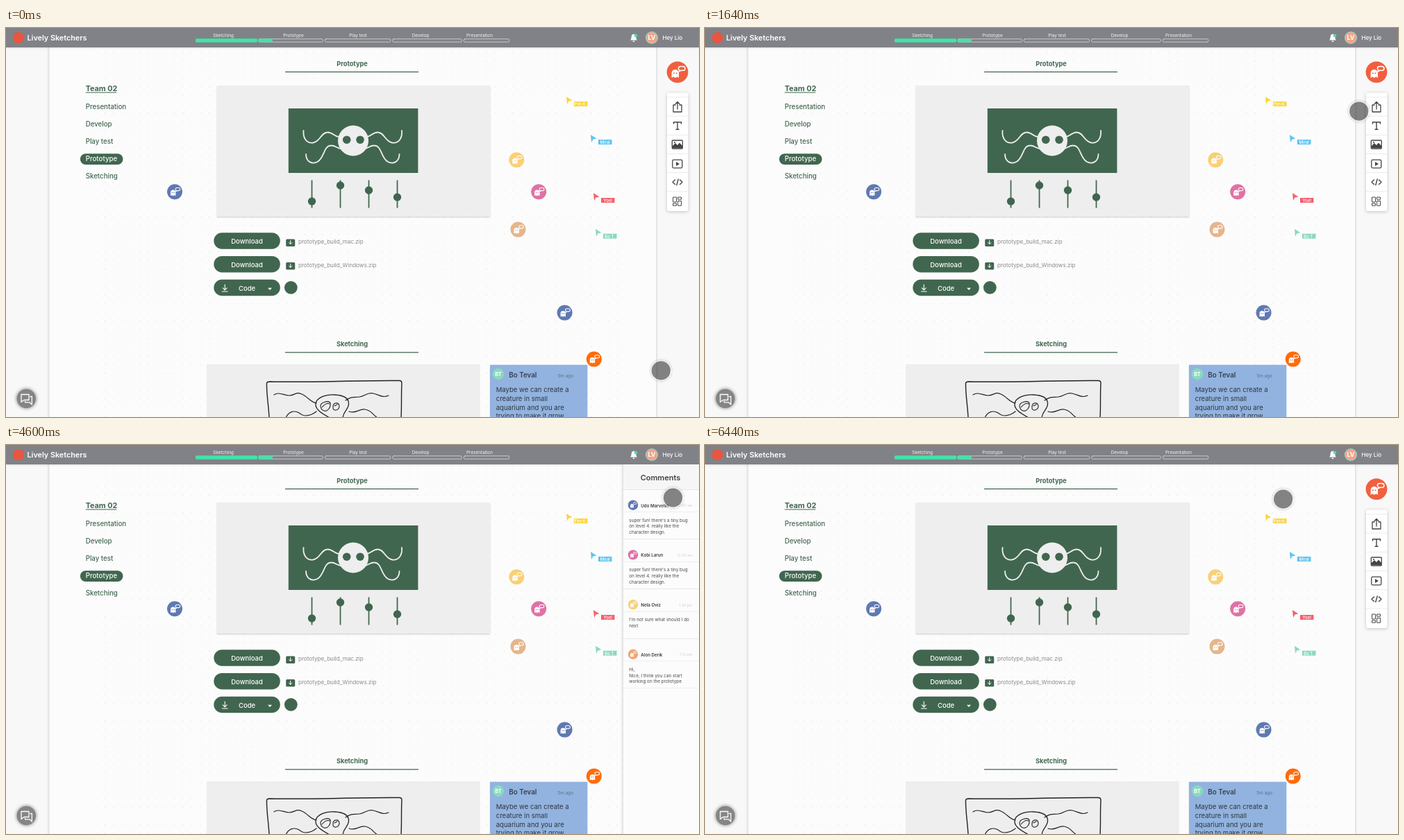
Recreate the animation shown at these times as an HTML page with a canvas. Size 998 by 561 pixels, loop 7 s.

```html
<!DOCTYPE html>
<html lang="en">
<head>
<meta charset="utf-8">
<title>Prototype board</title>
<style>
html, body { margin: 0; width: 100%; height: 100%; overflow: hidden; background: #fbfbfb; }
canvas { display: block; width: 998px; height: 561px; }
</style>
</head>
<body>
<canvas id="stage"></canvas>
<script>
const W = 998, H = 561, LOOP = 7000, STEP = 40;
const GREEN = '#41664f', BLUE = '#5f79b2', PINK = '#df72a6', YELLOW = '#f9d077', TAN = '#e6b58c', MINT = '#8ad9bd';
const ratio = window.devicePixelRatio || 1;
let g;

function setup(canvas) {
  canvas.width = W * ratio;
  canvas.height = H * ratio;
  const c = canvas.getContext('2d');
  c.scale(ratio, ratio);
  return c;
}

function layer(draw) {
  const canvas = document.createElement('canvas');
  g = setup(canvas);
  draw();
  return canvas;
}

function text(s, x, y, size, color, weight = 400, align = 'left') {
  g.font = `${weight} ${size}px Inter, sans-serif`;
  g.fillStyle = color;
  g.textAlign = align;
  g.textBaseline = 'alphabetic';
  g.fillText(s, x, y + size * 0.36);
}

function rect(x, y, w, h, color, r = 0) {
  g.fillStyle = color;
  g.beginPath();
  g.roundRect(x, y, w, h, r);
  g.fill();
}

function frame(x, y, w, h, color, lw = 1, r = 0) {
  g.strokeStyle = color;
  g.lineWidth = lw;
  g.beginPath();
  g.roundRect(x, y, w, h, r);
  g.stroke();
}

function disc(x, y, r, color) {
  g.fillStyle = color;
  g.beginPath();
  g.arc(x, y, r, 0, 7);
  g.fill();
}

function stroke(d, color, lw = 1) {
  g.strokeStyle = color;
  g.lineWidth = lw;
  g.lineCap = g.lineJoin = 'round';
  g.stroke(new Path2D(d));
}

function fill(d, color) {
  g.fillStyle = color;
  g.fill(new Path2D(d));
}

function at(x, y, scale, draw) {
  g.save();
  g.translate(x, y);
  g.scale(scale, scale);
  draw();
  g.restore();
}

function shadowed(color, blur, dx, dy, draw) {
  g.save();
  g.shadowColor = color;
  g.shadowBlur = blur * ratio;
  g.shadowOffsetX = dx * ratio;
  g.shadowOffsetY = dy * ratio;
  draw();
  g.restore();
}

// Round badge holding a ghost and a speech bubble
function badge(x, y, r, color) {
  disc(x, y, r, color);
  at(x, y, r / 11, () => {
    fill('M-6 6V1A3.7 3.7 0 0 1 1.4 1V6L-.4 4.8L-2.3 6L-4.2 4.8Z', '#fff');
    disc(-3.6, 1.2, 0.75, color);
    disc(-1, 1.2, 0.75, color);
    stroke('M2.8 -5.8H6Q7.8 -5.6 7.8 -3.7Q7.8 -1.9 6 -1.7H3.6L1.6 -.6L2 -2.1Q1 -2.6 1 -3.8Q1 -5.6 2.8 -5.8Z', '#fff', 1.1);
  });
}

function pointer(x, y, color, name) {
  fill(`M${x} ${y}l8.5 5.6l-5 1l-2.4 4.4z`, color);
  rect(x + 11, y + 7, 19.5, 7, color);
  text(name, x + 20.7, y + 10.7, 6, '#fff', 500, 'center');
}

function heading(s, y) {
  text(s, 498.5, y, 9.2, GREEN, 700, 'center');
  rect(402, y + 11.3, 192, 1.2, GREEN);
}

function header() {
  shadowed('rgba(0,0,0,.12)', 3, 0, 1, () => rect(0, 0, W, 28, '#818287'));
  disc(18, 14, 8, '#e9553f');
  text('Lively Sketchers', 30.5, 14, 10.8, '#fff', 600);
  const phases = [
    ['Sketching', 313, 273, 89, 1], ['Prototype', 414, 363.5, 93, 0.22],
    ['Play test', 507, 459, 95, 0], ['Develop', 597, 556.5, 100, 0], ['Presentation', 682, 659, 66, 0]
  ];
  for (const [name, mid, x, w, done] of phases) {
    text(name, mid, 10.3, 6.4, '#f4f4f4', 400, 'center');
    frame(x + 0.3, 15.8, w - 0.6, 4.4, done === 1 ? '#43e2a8' : '#dcdcde', 0.8, 1.5);
    if (done) rect(x, 15.5, w * done, 5, '#43e2a8', 1.5);
  }
  fill('M899 17.5Q900.7 16 900.7 12.5Q900.9 9 904 8.8Q907.2 9 907.3 12.5Q907.3 16 909 17.5ZM902.4 18.5H905.6Q905.3 20.2 904 20.2Q902.7 20.2 902.4 18.5Z', '#fff');
  disc(907, 11, 2.3, '#43e2a8');
  disc(930, 14, 9, '#9bd8bc');
  disc(930, 14, 7.9, '#f0a48c');
  text('LV', 930, 14, 8.8, '#fff', 700, 'center');
  text('Hey Lio', 945.5, 14.5, 8, '#fff', 500);
}

function creature() {
  rect(406.8, 115.9, 186.6, 93.1, GREEN);
  const arms = 'M428.5 148C427.5 159 433 166.5 442 165.5C453 164 453 151 463 150.5C471 150 473 158 481 157' +
    'M432 182C432 193 441 197 448.5 193C459 187 457 170 468 169.5C475 169 477 175 484 174';
  stroke(arms, '#eee', 1.8);
  g.save();
  g.translate(998.5, 0);
  g.scale(-1, 1);
  stroke(arms, '#eee', 1.8);
  g.restore();
  disc(500, 162.5, 22, '#eee');
  disc(490.7, 161.2, 5.8, GREEN);
  disc(510, 161.2, 5.8, GREEN);
  [250, 227, 234, 244].forEach((y, i) => {
    const x = 440.5 + i * 41;
    rect(x - 0.9, 219.5, 1.8, 40, GREEN);
    disc(x, y, 5.7, GREEN);
  });
}

function downloads() {
  [295.2, 328.9, 362.7].forEach((y, i) => {
    rect(299.3, y, 95.5, 23.5, GREEN, 11.7);
    text(i < 2 ? 'Download' : 'Code', 347, y + 12.5, 9.5, '#fff', 500, 'center');
  });
  ['mac', 'Windows'].forEach((os, i) => {
    const y = 308.4 + i * 33.6;
    rect(403.2, y - 4, 13, 10.5, GREEN, 1.5);
    stroke(`M409.7 ${y - 1.8}v5M407.5 ${y + 1.2}l2.2 2.2l2.2 -2.2`, '#fff', 1);
    text(`prototype_build_${os}.zip`, 421, y, 8.1, '#8b8b8b');
  });
  stroke('M315.2 370V377.5M312.2 374.8L315.2 377.8L318.2 374.8M311.5 380H319', '#fff', 1.1);
  fill('M377 374.8H383L380 378Z', '#fff');
  disc(410.3, 374.3, 9.4, GREEN);
}

function sketch() {
  rect(288.8, 485, 394, 80, '#eee');
  const ink = '#222';
  stroke('M379 562C378 542 375 528 375.5 512.5Q375.5 510 380 510C440 511.5 500 508 566 508.5Q570 508.5 570 512C569 530 570 545 569 562', ink, 1.4);
  stroke('M386 529C393 524 400 530 408 530C416 530 417 524 426 528C435 532 439 540 447 541', ink, 1.2);
  stroke('M489 537C497 531 501 533 509 532C517 531 520 525 529 527C538 529 542 534 551 530', ink, 1.2);
  stroke('M403 562C407 553 415 551 422 555Q427 559 431 559Q440 559 447 553', ink, 1.2);
  stroke('M494 553C503 557 508 549 517 550C526 551 528 558 535 562', ink, 1.2);
  stroke('M466 562C455 556 445 550 446 542C447 533 460 528.5 473 529C485 529.5 493 533 493.5 541C494 550 486 552 485 562', ink, 1.3);
  stroke('M453 545C453 540 465 536 467 541C468 547 463 554 458 552Q453 550 453 545M455 547Q461 540 466 542', ink, 1.1);
  stroke('M471 545C472 540 479 539 480 545C480 551 473 553 471 549ZM473 545L477 543', ink, 1.1);
}

function note() {
  shadowed('rgba(0,0,0,.15)', 2, 0, 1, () => rect(697, 485.8, 140.3, 80, '#92b3df'));
  disc(709, 499, 8.2, MINT);
  text('BT', 709, 499.2, 7.5, '#fff', 700, 'center');
  text('Bo Teval', 724.3, 500, 9.8, '#35414f', 600);
  text('5m ago', 794.5, 501.3, 6.4, '#5d6f88');
  ['Maybe we can create a', 'creature in small', 'aquarium and you are', 'trying to make it grow'].forEach((s, i) =>
    text(s, 705.7, 522 + i * 12.6, 9.55, '#2e3640'));
}

function toolbar() {
  shadowed('rgba(0,0,0,.22)', 5, 0, 1, () => rect(952, 93.5, 30.5, 170.5, '#fff', 3));
  for (let i = 0; i < 6; i++) rect(952, 99.5 + i * 27.2, 30.5, 0.7, '#e2e2e2');
  const dark = '#444';
  stroke('M964 111H961V121H973V111H970M967 117V106.8M964 109.5L967 106.5L970 109.5', dark, 1.3);
  stroke('M961.5 138V135.8H972.5V138M967 135.8V146.2M965 146.2H969', dark, 1.4);
  frame(959.3, 162, 15, 12, dark, 1.3, 1);
  fill('M960 173V170L964 166L967 169L970 165.5L974 170V173Z', dark);
  disc(963, 165, 1.1, dark);
  frame(959.8, 190.2, 14, 11.6, dark, 1.3, 1.5);
  fill('M965 193V199L970 196Z', dark);
  stroke('M963.5 219L960 222.3L963.5 225.6M970.5 219L974 222.3L970.5 225.6M968.2 218L965.8 226.5', dark, 1.4);
  frame(961, 244, 4.5, 7, dark, 1);
  frame(961, 253, 4.5, 3.2, dark, 1);
  frame(968, 244, 4.5, 3.2, dark, 1);
  frame(968, 249.5, 4.5, 6.7, dark, 1);
}

function page() {
  rect(0, 0, W, H, '#f8f8f8');
  shadowed('rgba(0,0,0,.22)', 4, 0, 0, () => rect(62.3, 0, 873.7, H + 10, '#fcfcfc'));
  for (let x = 130; x <= 880; x += 12.5)
    for (let y = 35; y < H; y += 12.5) disc(x, y, 0.6, '#d8d8d8');

  heading('Prototype', 51.5);
  text('Team 02', 114.7, 87.5, 10.8, GREEN, 700);
  rect(114.7, 92.6, 44.5, 1, GREEN);
  rect(106.8, 181.2, 61.7, 15.8, GREEN, 7.9);
  ['Presentation', 'Develop', 'Play test', 'Prototype', 'Sketching'].forEach((s, i) =>
    text(s, 114.7, 114 + i * 24.9, 9.7, i === 3 ? '#fff' : GREEN, 500));

  shadowed('rgba(0,0,0,.2)', 2, 0, 1, () => rect(304, 83, 393.3, 189, '#eee'));
  creature();
  downloads();
  heading('Sketching', 456);
  sketch();
  note();

  pointer(807, 99, '#fbd43c', 'Pim K.');
  pointer(842, 154, '#5bc4f0', 'Miral');
  pointer(846, 238, '#f4606c', 'Yoel');
  pointer(849, 289.7, MINT, 'Bo T.');
  badge(243, 236.3, 11, BLUE);
  badge(735.3, 190.3, 11, YELLOW);
  badge(767.2, 236.3, 11, PINK);
  badge(737.5, 290.6, 11, TAN);
  badge(804.6, 410.6, 11, BLUE);
  badge(846.8, 477.6, 11, '#ff6b0a');
  badge(967, 63.6, 15.4, '#f0603f');
  toolbar();

  shadowed('rgba(0,0,0,.3)', 4, 0, 0, () => disc(29.3, 534.5, 15, '#c9c9c9'));
  disc(29.3, 534.5, 13.7, '#858585');
  stroke('M22 528.5H33V536.5H26L22 539.5ZM35 531.5H37.3V543L33.8 539.8H27.5V538.5', '#fff', 1.3);
  header();
}

function comments() {
  shadowed('rgba(0,0,0,.18)', 4, -1, 1, () => rect(889, 28, 120, H, '#fcfcfc'));
  rect(889, 28, 109, 36, '#f6f6f6');
  rect(889, 64, 109, 0.8, '#e2e2e2');
  text('Comments', 942.5, 47.3, 11, '#424247', 600, 'center');
  const bug = ['super fun! there\'s a tiny bug', 'on level 4. really like the', 'character design.'];
  const posts = [
    ['Udo Marvelin', BLUE, '9:00 am', bug],
    ['Kobi Larun', PINK, '12:30 am', bug],
    ['Nela Oviz', YELLOW, '1:30 pm', ['I\'m not sure what should I do', 'next']],
    ['Alon Derik', '#efa775', '7:12 pm', ['Hi,', 'Nice, I think you can start', 'working on the prototype']]
  ];
  posts.forEach(([name, color, time, lines], i) => {
    const y = 86.7 + i * 71.7;
    badge(903, y, 7.2, color);
    text(name, 914.3, y + 0.8, 6.2, '#3c3c42', 600);
    text(time, 988.5, y + 0.8, 5.2, '#cfcfcf', 400, 'right');
    rect(889, y + 9.6, 109, 0.7, '#e8e8e8');
    rect(889, y + 48.6, 109, 0.7, '#e2e2e2');
    lines.forEach((s, n) => text(s, 897.3, y + 21.8 + n * 8.7, 6.35, '#4a4a4e'));
  });
  // Keep the header clear of the panel's shadow
  g.clearRect(0, 0, W, 28);
}

// Time, x, y of the way up to the comment button
const way = [
  [0, 943.3, 494], [520, 943.3, 494], [800, 930, 425], [1040, 916, 283.5], [1200, 917, 207.5],
  [1640, 941.8, 120], [1920, 955, 92], [2640, 960.8, 73], [2880, 961, 71.5], [4600, 961, 71.5]
];

function slope(i, k) {
  return (way[i + 1][k] - way[i][k]) / (way[i + 1][0] - way[i][0]);
}

function tangent(i, k) {
  if (i === 0 || i === way.length - 1) return 0;
  const a = slope(i - 1, k), b = slope(i, k);
  return a * b > 0 ? 2 * a * b / (a + b) : 0;
}

function along(t, k) {
  let i = 0;
  while (t >= way[i + 1][0]) i++;
  const h = way[i + 1][0] - way[i][0], u = (t - way[i][0]) / h, v = 1 - u;
  return way[i][k] * (1 + 2 * u) * v * v + tangent(i, k) * h * u * v * v +
    way[i + 1][k] * u * u * (3 - 2 * u) - tangent(i + 1, k) * h * u * u * v;
}

const clamp = v => Math.min(1, Math.max(0, v));
const ease = u => u < 0.5 ? 4 * u ** 3 : 1 - 4 * (1 - u) ** 3;

function cursorAt(t) {
  if (t < 4600) return [along(t, 1), along(t, 2)];
  const s = ease(clamp((t - 4840) / 1460));
  return [960.5 - 127.8 * s, 76 + 2 * s - 58 * s * (1 - s)];
}

function cursor(x, y) {
  const halo = g.createRadialGradient(x, y, 13, x, y, 18);
  halo.addColorStop(0, 'rgba(0,0,0,.16)');
  halo.addColorStop(1, 'rgba(0,0,0,0)');
  g.fillStyle = halo;
  g.beginPath();
  g.arc(x, y, 18, 0, 7);
  g.arc(x, y, 13.5, 0, 7, true);
  g.fill('evenodd');
  g.strokeStyle = 'rgba(255,255,255,.55)';
  g.lineWidth = 1.6;
  g.beginPath();
  g.arc(x, y, 14.3, 0, 7);
  g.stroke();
  disc(x, y, 13.6, 'rgba(0,0,0,.48)');
}

const base = layer(page);
const panel = layer(comments);
const stage = setup(document.getElementById('stage'));

function render(now) {
  const t = Math.floor((now % LOOP) / STEP) * STEP;
  g = stage;
  g.drawImage(base, 0, 0, W, H);
  g.globalAlpha = clamp((t - 3280) / 160) - clamp((t - 6280) / 160);
  if (g.globalAlpha > 0) g.drawImage(panel, 0, 0, W, H);
  g.globalAlpha = 1;
  cursor(...cursorAt(t));
  requestAnimationFrame(tick);
}

let start;
function tick(now) {
  start ??= now;
  render(Math.max(0, now - start));
}
requestAnimationFrame(tick);
</script>
</body>
</html>
```
